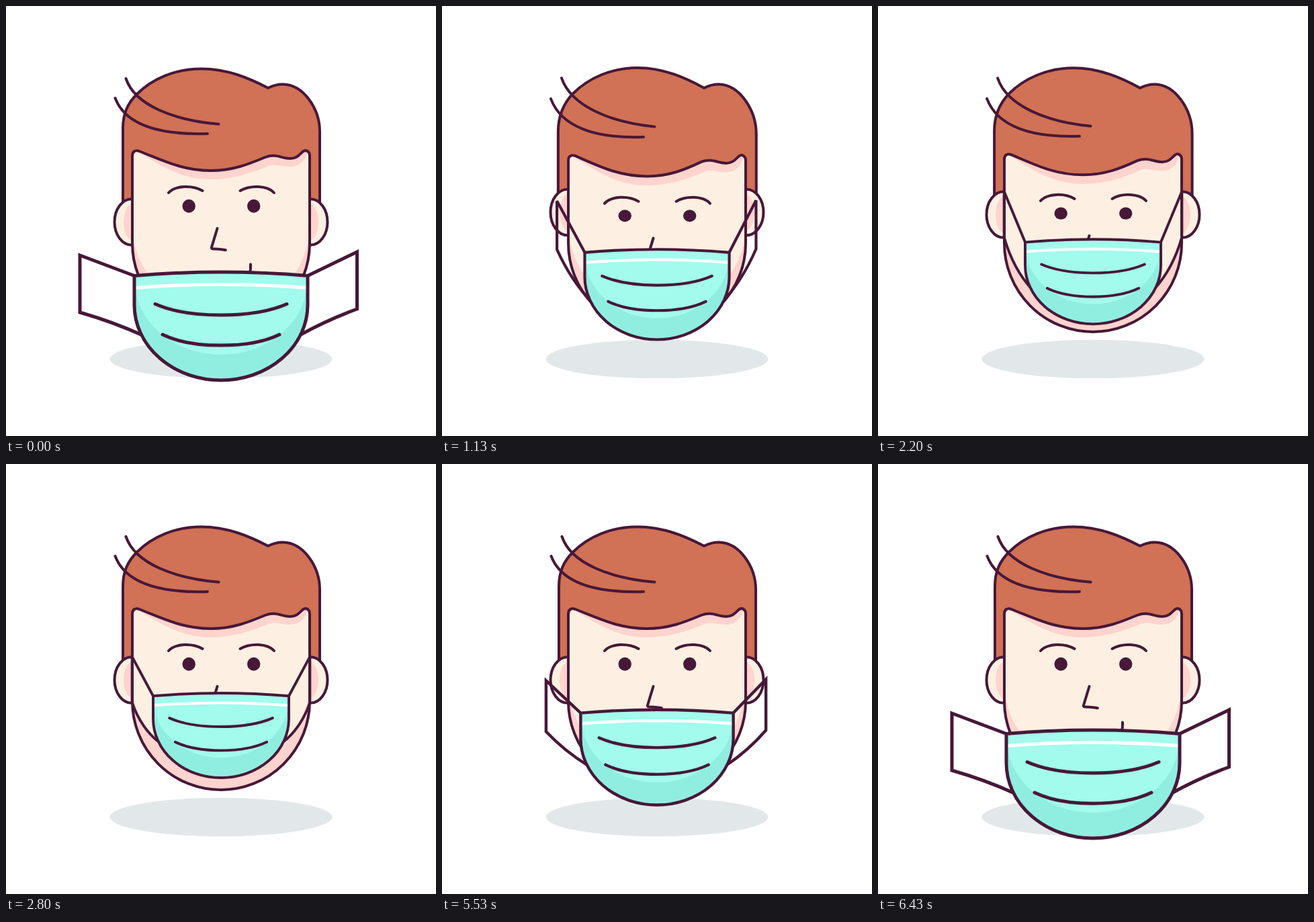
An HTML page for the animation above (7210 ms loop, 640 by 640 pixels).

```html
<!DOCTYPE html>
<html lang="en">
<head>
<meta charset="utf-8">
<title>Putting on a face mask</title>
<style>
  html, body { margin: 0; width: 100%; height: 100%; overflow: hidden; background: #fff; }
  svg { display: block; width: 100vw; height: 100vh; }
  .line { fill: none; stroke: #471838; stroke-width: 4; stroke-linecap: round; stroke-linejoin: round; }
  .skin { fill: #fdf0e2; }
  .pink { fill: #ffd3ce; }
  .hair { fill: #d17155; }
  .ink { fill: #471838; }
  .mask .line { stroke-width: 5; }
  .mask .edge { stroke-linejoin: miter; }
</style>
</head>
<body>
<svg viewBox="0 0 640 640">
  <defs>
    <clipPath id="faceClip"><path id="faceArea"/></clipPath>
    <clipPath id="maskClip"><path id="maskArea"/></clipPath>
  </defs>

  <ellipse cx="320" cy="525.5" rx="165.5" ry="28.8" fill="#e2e8ea"/>
  <path id="hair" class="line hair" style="fill:#d17155"/>

  <g id="ears">
    <g id="ear">
      <ellipse class="skin" cx="187" cy="321.5" rx="25.5" ry="34.3"/>
      <ellipse class="pink" cx="190" cy="321.5" rx="15" ry="28"/>
      <ellipse class="line" cx="187" cy="321.5" rx="25.5" ry="34.3"/>
    </g>
    <use href="#ear" transform="matrix(-1 0 0 1 640 0)"/>
  </g>

  <g clip-path="url(#faceClip)">
    <rect class="skin" x="180" y="200" width="280" height="300"/>
    <path class="pink" d="M188 353A132 132 0 0 0 452 353V325A132 132 0 0 1 188 325Z"/>
    <path id="brow" class="pink"/>
  </g>
  <path id="face" class="line"/>
  <path id="strand1" class="line"/>
  <path id="strand2" class="line"/>

  <g id="brows" class="line">
    <path d="M242 278C252 267 277 266 292.5 275"/>
    <path d="M399 278C389 267 364 266 348.5 275"/>
  </g>
  <ellipse id="eyeL" class="ink" cx="272.2" rx="9.7"/>
  <ellipse id="eyeR" class="ink" cx="368.7" rx="9.7"/>
  <g id="nose" class="line">
    <path d="M314.5 331L306 359Q305.3 361.3 308 361.5C316 361.8 322 362 326.8 363.3"/>
    <path d="M364 384.5Q364.5 391 362.5 400"/>
  </g>

  <g id="mask" class="mask">
    <path id="strapL" class="line edge"/>
    <path id="strapR" class="line edge"/>
    <g clip-path="url(#maskClip)">
      <rect x="-135" y="-170" width="270" height="175" fill="#a2fbec"/>
      <path d="M-129 -150A129 112 0 0 0 129 -150V5H-129Z" fill="#90eee1"/>
      <path d="M-129 -137.5Q0 -147.5 129 -137.5" fill="none" stroke="#fff" stroke-width="5"/>
    </g>
    <path id="maskEdge" class="line edge"/>
    <path class="line" d="M-98 -113.5C-48 -91.5 48 -91.5 98 -113.5"/>
    <path class="line" d="M-87 -68C-43 -46.5 43 -46.5 87 -68"/>
  </g>
</svg>

<script>
const LOOP = 7210;
const $ = id => document.getElementById(id);
const set = (id, name, value) => $(id).setAttribute(name, value);
const draw = (id, d) => set(id, 'd', d);
const lerp = (a, b, k) => a + (b - a) * k;
const bez = (a, b, u) => 3 * (1 - u) * (1 - u) * u * a + 3 * (1 - u) * u * u * b + u * u * u;

// Ease in and out between two times, as cubic-bezier(.42, 0, .58, 1).
function ease(t, from, to) {
  const x = Math.min(1, Math.max(0, (t - from) / (to - from)));
  let lo = 0, hi = 1;
  for (let i = 0; i < 24; i++) {
    const mid = (lo + hi) / 2;
    if (bez(0.42, 0.58, mid) < x) lo = mid; else hi = mid;
  }
  return bez(0, 1, (lo + hi) / 2);
}

const maskPath = 'M-129 -155.5Q0 -166.5 129 -155.5V-112A129 112 0 0 1 -129 -112Z';
draw('maskArea', maskPath);
draw('maskEdge', maskPath);

// side is -1 or 1; the outer end runs from its loose place to the ear.
function strap(side, loose, worn, lift) {
  const [x, top, low] = loose.map((v, i) => lerp(v, worn[i], on) - (i ? lift : 0));
  const endX = 117, endY = -67;
  const bow = lerp(-3, 11, on);
  const cx = (x + endX) / 2 + bow * 0.8, cy = (low + endY) / 2 + bow;
  return `M${side * 129} -155.5L${side * x} ${top}V${low}Q${side * cx} ${cy} ${side * endX} ${endY}`;
}

let on = 0;

function drawHead(n) {
  const left = 174 - 1.5 * n, right = 467 + n;
  const top = 93.5 - 2 * n, earY = 321.5 - 19 * n;
  draw('hair', `M${left} ${earY}V${182 + 7 * n}C${left} ${160 + 4 * n} 181 145 195 ${131 - n}` +
    `C218 ${108 - n} 252 ${top} 291 ${top}C330 ${top} 363 ${108 - n} 390 122` +
    `C398 118 404 116.5 412 116.5C443 117 ${right} ${153 + 3 * n} ${right} ${187 + 5 * n}V${earY}`);
  set('ears', 'transform', `translate(0 ${-19 * n})`);

  const a = 9 * n, b = 11 * n;
  const face = `M188 353V${223 + a}C188 ${217 + a} 192 ${214 + a} 198 ${216 + a}` +
    `C232 ${229 + b} 262 ${245 + b} 305 ${245 + b}C338 ${245 + b} 362 ${235 + b} 386 ${225 + a}` +
    `C402 ${219 + a} 410 ${227 + a} 423 ${227 + a}C433 ${227 + a} 437 ${221 + a} 442 ${216.5 + a}` +
    `C447 ${213 + a} 452 ${217 + a} 452 ${223 + a}V353A132 132 0 0 1 188 353Z`;
  draw('face', face);
  draw('faceArea', face);
  const c = 12 * n;
  draw('brow', `M192 ${215 + a}C228 ${236 + b} 260 ${258 + c} 303 ${258 + c}` +
    `C345 ${258 + c} 372 ${245 + c} 394 ${237 + b}C404 ${235 + b} 414 ${240 + b} 426 ${239 + b}` +
    `C440 ${237 + b} 446 ${228 + a} 449 ${216 + a}V200H192Z`);

  draw('strand1', `M${178.5 - 0.7 * n} ${108 - n}C192 ${148 + n} 250 ${170 + 4 * n} 316.5 ${175.8 + 5 * n}`);
  draw('strand2', `M${162.5 - 0.7 * n} ${137 + 1.5 * n}C178 ${178 + 4 * n} 230 ${192 + 7 * n} 300 ${190 + 6.5 * n}`);

  set('brows', 'transform', `translate(0 ${20.7 * n})`);
  for (const id of ['eyeL', 'eyeR']) {
    set(id, 'cy', 297.8 + 18.8 * n);
    set(id, 'ry', 10 - 1.4 * n);
  }
  set('nose', 'transform', `translate(0 ${19 * n})`);
}

function render(t) {
  const nod = ease(t, 0, 1700) - ease(t, 1700, 2800);
  on = ease(t, 0, 1700) - ease(t, 4730, 6430);
  drawHead(nod);

  const scale = lerp(1, 0.783, on);
  set('mask', 'transform', `translate(320 ${lerp(557, 467, on) + 11 * nod}) scale(${scale})`);
  const lift = 30 * nod / scale;
  draw('strapL', strap(-1, [210, -186, -101], [169, -230, -143], lift));
  draw('strapR', strap(1, [202.5, -191, -106], [169, -230, -143], lift));
}

function tick() {
  render(performance.now() % LOOP);
  requestAnimationFrame(tick);
}
tick();
</script>
</body>
</html>
```
